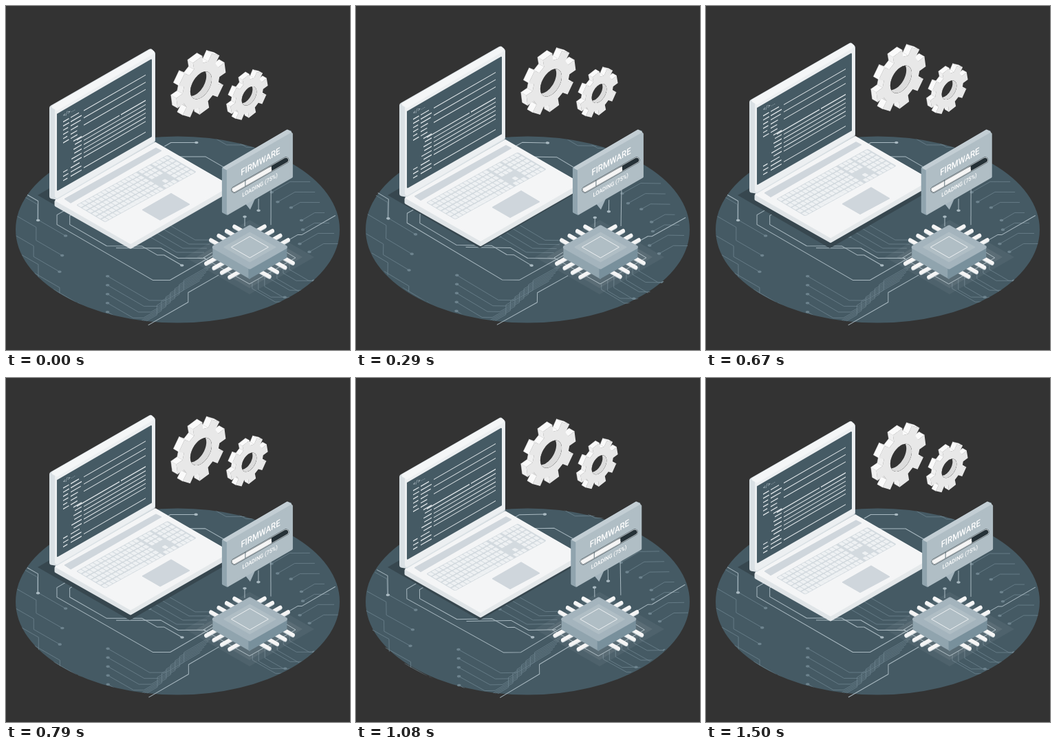
An HTML page that plays this animation: 500 by 500 pixels, repeating every 1540 ms.

```html
<!DOCTYPE html>
<html lang="en">
<head>
<meta charset="utf-8">
<style>
html, body { margin: 0; width: 100%; height: 100%; overflow: hidden; background: #333; }
svg { display: block; width: 100%; height: 100%; }
.line { fill: none; stroke-linejoin: round; }
text { font-family: Roboto, "Open Sans", sans-serif; font-weight: 500; fill: #fff; }
</style>
</head>
<body>
<svg id="stage" viewBox="0 0 500 500"></svg>
<script>
const LOOP = 1540, PHASE = 50;
const DISC = { x: 249.5, y: 325, rx: 235.5, ry: 135.5 };

let seed = 11;
const random = (min, max) => {
  seed = seed * 16807 % 2147483647;
  return min + (max - min) * seed / 2147483647;
};

const poly = (points, fill, round = 0) =>
  `<polygon points="${points}" fill="${fill}" stroke="${fill}" stroke-width="${round}" stroke-linejoin="round"/>`;
const line = (points, color, width = 1, cap = 'butt') =>
  `<polyline class="line" points="${points}" stroke="${color}" stroke-width="${width}" stroke-linecap="${cap}"/>`;
const rect = (x, y, w, h, fill, r = 0) =>
  `<rect x="${x}" y="${y}" width="${w}" height="${h}" rx="${r}" fill="${fill}"/>`;
const group = (content, attrs = '') => `<g ${attrs}>${content}</g>`;
const ellipse = (x, y, rx, ry, fill) =>
  `<ellipse cx="${x}" cy="${y}" rx="${rx}" ry="${ry}" fill="${fill}"/>`;
const diamond = (x, y, w, h) => [[x - w, y], [x, y - h], [x + w, y], [x, y + h]].join(' ');

function floor() {
  const HEADING = { E: 0, SE: 30, S: 90, SW: 150, W: 180, NW: 210, N: 270, NE: 330 };
  const trace = (x, y, route, color, width, dot = true) => {
    const points = [[x, y]];
    for (const [, dir, length] of route.matchAll(/([A-Z]+)([\d.]+)/g)) {
      const a = HEADING[dir] * Math.PI / 180;
      points.push([x += length * Math.cos(a), y += length * Math.sin(a)]);
    }
    return line(points.join(' '), color, width) + (dot ? ellipse(x, y, 2.8, 1.8, color) : '');
  };
  const dim = (...args) => trace(...args, '#6d838e', .8);
  const bright = (x, y, route, dot) => trace(x, y, route, '#a9b9c1', 1, dot);

  let faint = '';
  for (let i = 0; i < 7; i++) {
    const edge = (200 - i * 12) * Math.PI / 180;
    faint += dim(DISC.x + DISC.rx * Math.cos(edge), DISC.y + DISC.ry * Math.sin(edge),
      `SE${random(20, 45)}S${random(14, 32)}SE${random(35, 75)}`);
    faint += dim(300 - i * 3, 375 + i * 4, `SW${48 + i * 4}S14SW${30 + i * 5}W${24 - i * 3}NW${70 - i * 9}`);
    faint += dim(358 + i * 9, 402 - i * 5, `S${random(8, 18)}SE${random(18, 42)}E${random(15, 28)}`);
    faint += dim(484 - i * 7, 345 - i * 15, `W${random(14, 30)}SW${random(15, 34)}`);
  }
  for (let i = 0; i < 4; i++) {
    faint += dim(300 + i * 32, 190 + i * 5, `SE${random(20, 30)}E40SE40`);
    faint += dim(300 - i * 4, 340 + i * 6, `W${25 + i * 5}NW${random(30, 60)}`);
  }
  return `<clipPath id="disc">${ellipse(DISC.x, DISC.y, DISC.rx, DISC.ry)}</clipPath>` +
    group(faint, 'clip-path="url(#disc)"') +
    bright(230, 204, 'NE11E37') + bright(246, 219, 'E44SE45', false) + bright(31, 275, 'SE18S28') +
    bright(100, 289, 'SW30S14SE161E25NE110', false) + bright(110, 295, 'SW20S13SE62E51SE26E10SE30') +
    bright(160, 352, 'E65SE29E40', false) + bright(207, 464, 'NE67N14NE51', false) +
    bright(400, 346, 'NE28E6NE56', false) + bright(385, 240, 'S78', false) + bright(367, 280, 'S17') +
    bright(347, 320, 'N14');
}

function codeLines() {
  const ink = '#e6ebee';
  const dash = (from, to, y, width = 1.4) => line(`${from},${y} ${to},${y}`, ink, width);
  let out = `<text x="83" y="209" font-size="7.5" style="fill:#b0bec5">&lt;/&gt;<tspan dx="1">...</tspan></text>`;
  for (let row = 0; row < 15; row++) {
    const y = 216 + row * 6.1;
    const indented = row > 5 && row < 12;
    if (!indented) out += dash(83, random(89, 92), y);
    out += indented ? dash(random(94, 105), 110, y) : dash(94, random(103, 110), y);
  }
  for (let i = 0; i < 3; i++) out += dash(113, 203, 217 + i * 10.5, 1.1);
  out += dash(103, 165, 254) + dash(167, 203, 254);
  for (let i = 1; i < 6; i++) out += dash(113, 203, 254 + i * 6.1, 1.1);
  return out + dash(113, 203, 300, 1.1);
}

function keyboard() {
  let keys = rect(0, 0, 133, 42, '#d3dadf', 2);
  for (let row = 0; row < 6; row++)
    for (let col = 0; col < 22; col++) {
      const space = row === 5 && col > 3 && col < 10;
      const gap = row > 2 && col > 14 && col < 18 && !(row === 5 || row === 4 && col === 16);
      const block = (col > 14) * 2.5 + (col > 17) * 2;
      if (!gap) keys += rect(1 + col * 5.75 + block, row * 7 + .8, space ? 5.8 : 4.8, 5.4, '#eef1f3', .8);
    }
  return group(keys, 'transform="matrix(1 -.55 1 .595 102 289)"');
}

function laptop() {
  return poly('73,284 217,201 324,262 324,268 181,350 73,289', '#dfe4e7', 5) +
    poly('181,345 325,262 325,269 181,352', '#e4e8ea') +
    poly('73,282 217,199 324,261 181,344', '#f4f5f6', 3) +
    poly('85,280 218,206 226,210 94,286', '#cfd6dc', 1) +
    keyboard() +
    poly('198,296 240,272 267,288 224,311', '#cfd6dc', 1) +
    poly('67,148 210,66 213,69 213,195 73,277 67,276', '#dae1e5', 8) +
    poly('74,151 213,70 213,194 74,276', '#eceff1', 6) +
    poly('69,146 210,65 213,67 74,149', '#f4f6f7', 5) +
    poly('75,157 211,78 211,189 75,267', '#455a64', 2) +
    group(codeLines(), 'transform="matrix(1 -.577 0 1 0 0)"');
}

function gear(cx, cy, radius, hole, turn) {
  const depth = radius * .19;
  const at = (r, deg) => {
    const a = deg * Math.PI / 180, x = r * Math.cos(a);
    return [cx + x * .866, cy + r * Math.sin(a) - x * .5];
  };
  const back = ([x, y]) => [x - depth, y - depth * .577];
  const rim = [];
  for (let k = 0; k < 8; k++)
    for (const [scale, offset] of [[.75, -14], [1, -11], [1, 11], [.75, 14]])
      rim.push(at(radius * scale, turn + k * 45 + offset));
  const bore = Array.from({ length: 48 }, (_, i) => at(hole, i * 7.5));
  const path = points => 'M' + points.join('L') + 'Z';

  const sides = rim.map((p, i) => {
    const q = rim[(i + 1) % rim.length], dx = q[0] - p[0], dy = q[1] - p[1];
    const visible = dx * .577 - dy > 0;
    const shade = dx > 3 ? '#fafafa' : dx > -3 ? '#f0f0f0' : '#e0e0e0';
    return visible ? poly([p, q, back(q), back(p)].join(' '), shade, .4) : '';
  }).join('');
  const id = `bore${cx}`;
  return `<clipPath id="${id}"><path d="${path(bore)}"/></clipPath>` + sides +
    `<path d="${path(rim)}${path(bore)}" fill="#e8e8e8" fill-rule="evenodd"/>` +
    group(`<path d="${path(bore)}" fill="#dcdcdc"/><path d="${path(bore.map(back))}" fill="#333"/>`,
      `clip-path="url(#${id})"`);
}

function chip() {
  let pins = '';
  const pin = (x, y, dx, dy) => pins +=
    line(`${x},${y + 1} ${x + dx},${y + dy + 1}`, '#cfd8dc', 5.6, 'round') +
    line(`${x},${y} ${x + dx},${y + dy}`, '#f5f5f5', 5.2, 'round');
  for (let i = 0; i < 4; i++) {
    const x = i * 11.4, y = i * 6.6;
    pin(298 + x, 340 - y, 14, 8);
    pin(376 + x, 320 + y, -14, 8);
    pin(291 + x, 374 + y, 16, -9);
    pin(367 + x, 384 - y, 16, 9);
  }
  return line('300,358 287,366 354,404 421,366 408,358', '#b0bec5') + pins +
    poly('302,352 354,382 354,395 302,365', '#90a4ae', 3) +
    poly('407,352 354,382 354,395 407,365', '#78909c', 3) +
    poly(diamond(354.5, 350.5, 52, 29.5), '#a4b4bd', 5) +
    poly(diamond(354.5, 350.5, 37, 21), '#b0bec5', 2) +
    `<polygon class="line" points="${diamond(354.5, 350.5, 27, 15.5)}" stroke="#eceff1"/>`;
}

function card() {
  const bar = (from, to, width, color) => line(`${from} ${to}`, color, width, 'round');
  return poly('316,236 409,182 413,183 322,239 322,302 316,299', '#90a4ae', 4) +
    poly('317,235 409,181 414,184 323,238', '#c3ced4', 3) +
    poly('347,286 364,276 355,296', '#a5b5be') +
    poly('323,239 415,186 415,248 323,301', '#b0bec5', 4) +
    bar('332,267', '407,224', 9.4, '#37474f') +
    bar('332,267', '407,224', 8.2, '#eceff1') +
    bar('332,267', '407,224', 6.8, '#263238') +
    bar('332,267', '383,238', 6.4, '#f5f5f5') +
    poly('382,235 386,233 386,239 382,241', '#f5f5f5') +
    line('348,253 348,262', '#455a64', .8) +
    `<text transform="matrix(.866 -.5 0 1 341.5 247)" font-size="13.1" font-weight="700">FIRMWARE</text>
     <text transform="matrix(.866 -.5 0 1 343.5 278)" font-size="8.5">LOADING (75%)</text>`;
}

stage.innerHTML =
  ellipse(DISC.x, DISC.y, DISC.rx, DISC.ry, '#455a64') +
  group(floor(), 'id="circuits"') +
  poly('46,275 75,258 217,200 328,267 180,352', '#37474f') +
  poly(diamond(354, 365, 94, 54), 'rgba(255,255,255,.05)') +
  poly(diamond(354, 365, 77, 45), 'rgba(255,255,255,.07)') +
  group(laptop() + gear(283.5, 115, 41.5, 18, -8) + gear(353.5, 130.5, 31.3, 12.5, -10), 'id="floating"') +
  group(chip() + card(), 'id="shaking"');

const [circuits, floating, shaking] =
  ['circuits', 'floating', 'shaking'].map(id => document.getElementById(id));

// Shake offsets at every tenth of the loop, mirrored about its middle.
const shakeAt = tenth => [0, -1, 2, -4, 4, -4][5 - Math.abs(tenth - 5)];

function draw(now) {
  const p = (now + PHASE) / LOOP % 1;
  const rise = 1 - Math.abs(2 * p - 1);
  const swing = 1 - 4 * Math.abs((p + .25) % 1 - .5);
  const tenth = Math.floor(p * 10);
  const shift = shakeAt(tenth) + (shakeAt(tenth + 1) - shakeAt(tenth)) * (p * 10 - tenth);
  floating.setAttribute('transform', `translate(0 ${1 - 10 * rise})`);
  circuits.setAttribute('transform', `rotate(${swing} 250 325)`);
  shaking.setAttribute('transform', `translate(${shift + .2} 0)`);
}

const start = performance.now();
function tick() {
  draw(performance.now() - start);
  requestAnimationFrame(tick);
}
tick();
</script>
</body>
</html>
```
